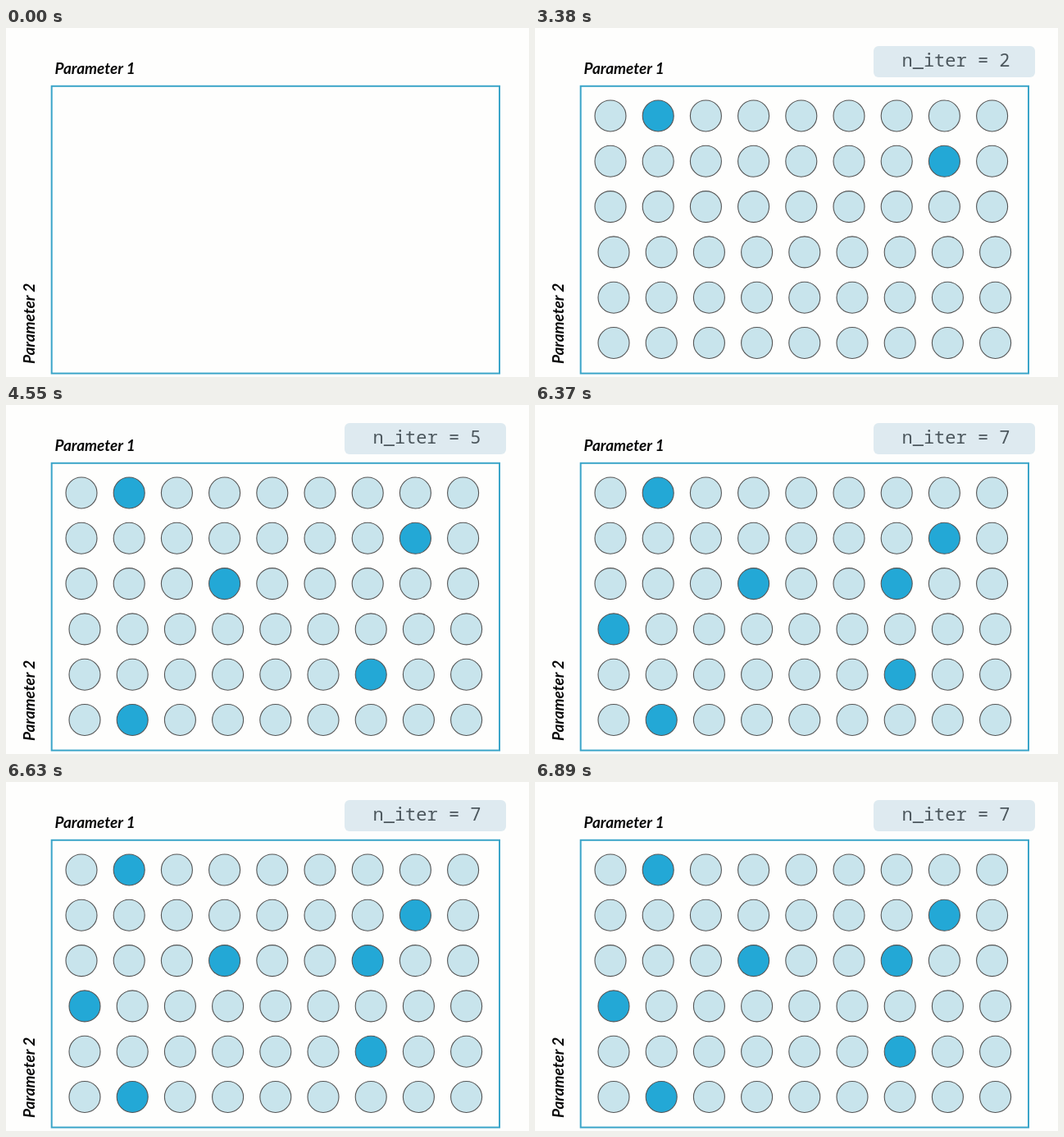
Recreate the animation shown at these times as an HTML page. Size 638 by 425 pixels, loop 7410 ms.

```html
<!DOCTYPE html>
<html lang="en">
<head>
<meta charset="utf-8">
<title>Random search</title>
<style>
  html, body { margin: 0; width: 100%; height: 100%; overflow: hidden; background: #fefefd; }
  svg { display: block; width: 638px; height: 425px; }
  .axis { font: italic 700 19px Lato, sans-serif; fill: #0a0a0a; }
  .frame { fill: none; stroke: #3ba5c9; stroke-width: 2; }
  circle { fill: #c8e4ec; stroke: #555; stroke-width: 1.1; }
  circle.picked { fill: #23a8d6; }
  .badge rect { fill: #deeaf0; }
  .badge text { font: 22px "Roboto Mono", "Noto Sans Mono", monospace; fill: #4c575d; text-anchor: middle; white-space: pre; }
</style>
</head>
<body>
<svg viewBox="0 0 638 425">
  <text class="axis" x="59.5" y="56">Parameter 1</text>
  <text class="axis" transform="translate(35 409) rotate(-90)">Parameter 2</text>
  <rect class="frame" x="55.7" y="70.8" width="546.3" height="349.8"/>
  <g id="grid"></g>
  <g id="badge" class="badge">
    <rect x="413" y="22" width="197" height="38" rx="6"/>
    <text id="label" x="513.5" y="47"></text>
  </g>
</svg>
<script>
  const LOOP = 7410, GRID_START = 1820, COLUMNS = 9, ROWS = 6;

  // Each step adds [column, row] samples to those already picked.
  const steps = [
    { at: 3380, cells: [[1, 0], [7, 1]] },
    { at: 4550, cells: [[3, 2], [6, 4], [1, 5]] },
    { at: 5850, cells: [[6, 2], [0, 3]] }
  ];

  const byId = id => document.getElementById(id);
  const grid = byId('grid'), badge = byId('badge'), label = byId('label');
  const show = (node, visible) => node.setAttribute('visibility', visible ? 'visible' : 'hidden');

  const dots = [];
  for (let row = 0; row < ROWS; row++) {
    for (let column = 0; column < COLUMNS; column++) {
      const dot = document.createElementNS('http://www.w3.org/2000/svg', 'circle');
      dot.setAttribute('cx', 92 + 58.2 * column + (row > 2 ? 4 : 0));
      dot.setAttribute('cy', 107 + 55.3 * row);
      dot.setAttribute('r', 19);
      grid.append(dot);
      dots.push(dot);
    }
  }

  function draw(time) {
    const picked = steps.filter(step => time >= step.at).flatMap(step => step.cells);
    const indices = new Set(picked.map(([column, row]) => row * COLUMNS + column));
    show(grid, time >= GRID_START);
    show(badge, picked.length > 0);
    label.textContent = `n_iter = ${picked.length}`;
    dots.forEach((dot, i) => dot.classList.toggle('picked', indices.has(i)));
  }

  const start = performance.now();
  function tick() {
    draw((performance.now() - start) % LOOP);
    requestAnimationFrame(tick);
  }
  tick();
</script>
</body>
</html>
```
